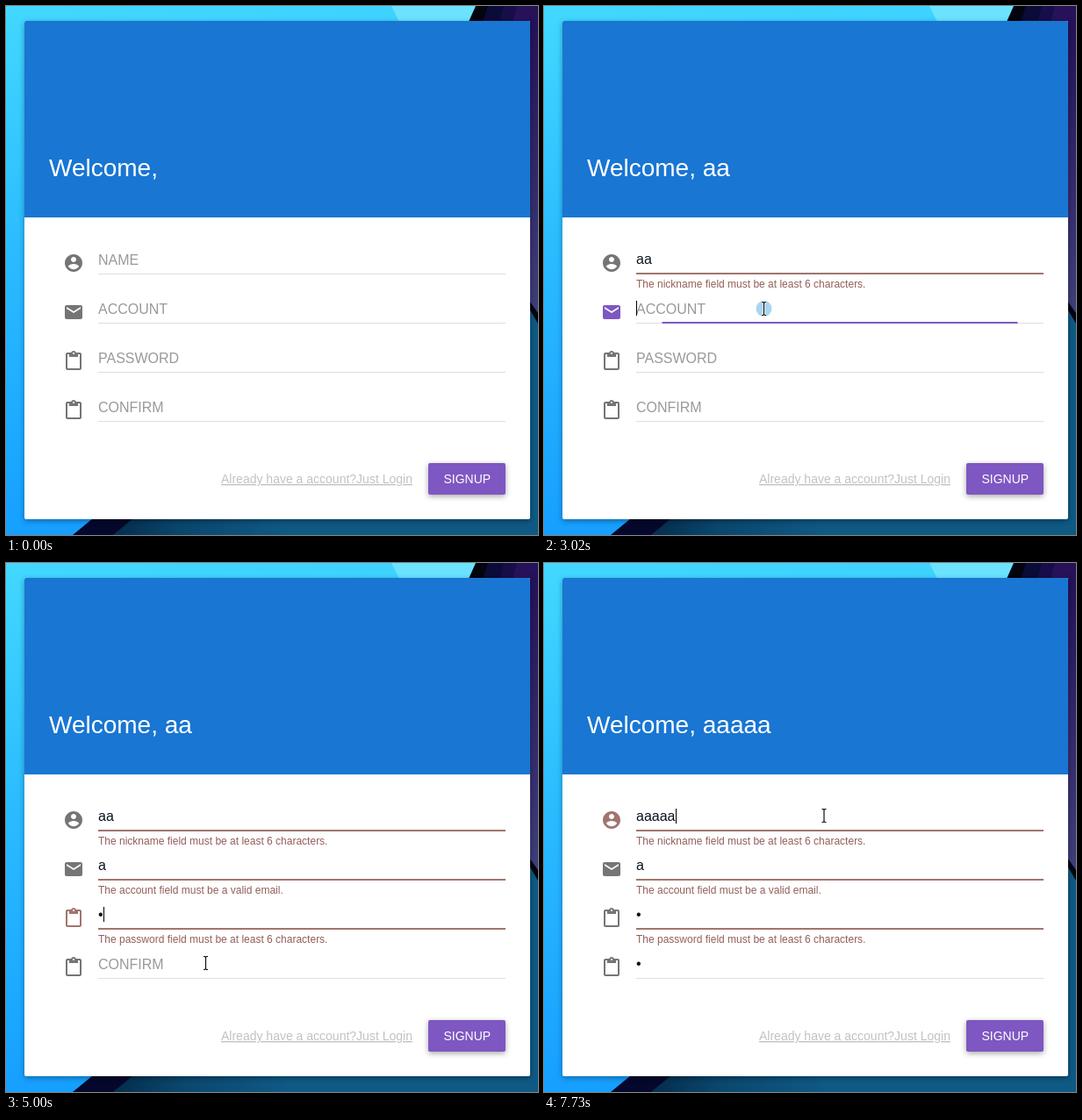
These frames come from a looping animation (606x603 px, 8 s). An HTML page:

```html
<!DOCTYPE html>
<html lang="en">
<head>
<meta charset="utf-8">
<title>Sign up form</title>
<style>
  html, body { margin: 0; width: 100%; height: 100%; overflow: hidden; }
  svg { display: block; width: 100vw; height: 100vh; font: 16px "Liberation Sans", Arial, sans-serif; }
  .card { filter: drop-shadow(0 2px 3px rgba(0, 0, 0, .35)); }
  .welcome { font-size: 28px; fill: #fff; }
  .small { font-size: 14px; }
  .label { fill: #999; }
  .value { fill: #0b1420; }
  .error { font-size: 12px; fill: #935e5a; }
</style>
</head>
<body>
<svg viewBox="0 0 606 603" xmlns="http://www.w3.org/2000/svg">
  <defs>
    <linearGradient id="sky" gradientUnits="userSpaceOnUse" x1="0" y1="0" x2="60" y2="603">
      <stop stop-color="#42d8ff"/><stop offset=".45" stop-color="#2bbcff"/><stop offset="1" stop-color="#169fff"/>
    </linearGradient>
    <linearGradient id="violet" x2="0" y2="1">
      <stop stop-color="#24115a"/><stop offset="1" stop-color="#40407a"/>
    </linearGradient>
    <linearGradient id="sea" gradientUnits="userSpaceOnUse" x1="130" x2="320">
      <stop stop-color="#052f50"/><stop offset=".35" stop-color="#0a466c"/><stop offset="1" stop-color="#0f5985"/>
    </linearGradient>
    <path id="person" d="M12 2C6.48 2 2 6.48 2 12s4.48 10 10 10 10-4.48 10-10S17.52 2 12 2zm0 3c1.66 0 3 1.34 3 3s-1.34 3-3 3-3-1.34-3-3 1.34-3 3-3zm0 14.2c-2.5 0-4.71-1.28-6-3.22.03-1.99 4-3.08 6-3.08 1.99 0 5.97 1.09 6 3.08-1.29 1.94-3.5 3.22-6 3.22z"/>
    <path id="mail" d="M20 4H4c-1.1 0-2 .9-2 2v12c0 1.1.9 2 2 2h16c1.1 0 2-.9 2-2V6c0-1.1-.9-2-2-2zm0 4l-8 5-8-5V6l8 5 8-5z"/>
    <path id="clipboard" d="M19 2h-4.18C14.4.84 13.3 0 12 0S9.6.84 9.18 2H5c-1.1 0-2 .9-2 2v16c0 1.1.9 2 2 2h14c1.1 0 2-.9 2-2V4c0-1.1-.9-2-2-2zm-7 0c.55 0 1 .45 1 1s-.45 1-1 1-1-.45-1-1 .45-1 1-1zm7 18H5V4h2v3h10V4h2z"/>
    <path id="beam" d="M-2.5 -7.5H-1L0 -6.5L1 -7.5H2.5M0 -6.5V6.5M-2.5 7.5H-1L0 6.5L1 7.5H2.5" fill="none"/>
  </defs>

  <rect width="606" height="603" fill="url(#sky)"/>
  <path d="M439 0H535L527 18H448z" fill="#6be3ff"/>
  <path d="M535 0H606V360H590V18H527z" fill="#04040f"/>
  <path d="M549 0H606V18H543z" fill="#0a0b38"/>
  <path d="M567 0H606V18H562z" fill="#170d48"/>
  <path d="M582 0H606V18H577z" fill="#27125a"/>
  <path d="M596 12H606V358L596 336z" fill="url(#violet)"/>
  <path d="M596 336L606 360V603H590V350z" fill="#0f5985"/>
  <path d="M596 336L606 350V362L596 345z" fill="#04040f"/>
  <path d="M99 584H606V603H76z" fill="#05082c"/>
  <path d="M145 584H606V603H122z" fill="url(#sea)"/>

  <rect class="card" x="21" y="17" width="576" height="568" rx="2" fill="#fff"/>
  <path d="M21 241V19a2 2 0 0 1 2-2H595a2 2 0 0 1 2 2V241z" fill="#1976d2"/>
  <text id="welcome" class="welcome" x="49" y="194"></text>
  <g id="fields"></g>
  <text class="small" x="245" y="544" fill="#c2c2c2" text-decoration="underline">Already have a account?Just Login</text>
  <rect class="card" x="481" y="521" width="88" height="36" rx="2" fill="#7e57c2"/>
  <text class="small" x="498.5" y="544" fill="#fff">SIGNUP</text>

  <g id="pointer">
    <circle id="press" r="9" fill="#a9d5f2"/>
    <use href="#beam" stroke="#fff" stroke-width="3" opacity=".9"/>
    <use href="#beam" stroke="#111" stroke-width="1.2"/>
  </g>
</svg>
<script>
const LOOP = 8000, GREY = '#757575', PURPLE = '#7e57c2', BROWN = '#a1756e';
const short = name => `The ${name} field must be at least 6 characters.`;

// focus: [from, to]; keys: times of typed characters; caret: visible spans
const fields = [
  { icon: 'person', label: 'NAME', char: 'a', step: 8.9, error: short('nickname'),
    focus: [[470, 2920], [6250, 9000]], keys: [785, 1850, 6890, 7330, 7730],
    caret: [[470, 1440], [1850, 2450], [6250, 6750], [6890, 8000]] },
  { icon: 'mail', label: 'ACCOUNT', char: 'a', step: 8.9, error: 'The account field must be a valid email.',
    focus: [[2920, 4430]], keys: [3260], caret: [[2920, 3920]] },
  { icon: 'clipboard', label: 'PASSWORD', char: '•', step: 5.6, error: short('password'),
    focus: [[4430, 5090]], keys: [4660], caret: [[4430, 5090]] },
  { icon: 'clipboard', label: 'CONFIRM', char: '•', step: 5.6, error: '',
    focus: [[5090, 6250]], keys: [5480], caret: [[5090, 5980]] }
];
const pointerPath = [
  [2690, 262, 326], [2900, 250.5, 345], [4060, 250.5, 345], [4280, 237.5, 406],
  [4720, 237.5, 406], [4990, 227.5, 456], [5650, 227.5, 456], [5860, 282, 380],
  [6070, 247.5, 290], [6330, 247.5, 290], [6530, 319, 288]
];
const clicks = [2920, 4430, 5090, 6250];

const $ = id => document.getElementById(id);
const clamp = v => Math.max(0, Math.min(1, v));
const easeOut = p => 1 - (1 - clamp(p)) ** 3;
const within = (t, spans) => spans.some(([a, b]) => t >= a && t < b);

$('fields').innerHTML = fields.map((f, i) => `
  <g transform="translate(0 ${i * 56})">
    <use class="icon" href="#${f.icon}" x="65" y="281"/>
    <rect x="105" y="305" width="464" height="1" fill="#dedede"/>
    <rect class="line" y="304" height="2"/>
    <text class="label" x="105" y="295">${f.label}</text>
    <text class="value" x="105" y="294"></text>
    <rect class="caret" y="280" width="1" height="17"/>
    <text class="error" x="105" y="321">${f.error}</text>
  </g>`).join('');
fields.forEach((f, i) => {
  const row = $('fields').children[i];
  for (const part of ['icon', 'line', 'label', 'value', 'caret', 'error'])
    f[part + 'El'] = row.querySelector('.' + part);
});

// The underline is already part-way out when the press first shows.
function lineAmount(f, t) {
  let amount = 0;
  for (const [from, to] of f.focus) {
    if (t >= to) amount = 1 - easeOut((t - to + 48) / 300);
    else if (t >= from) amount = easeOut((t - from + 48) / 300);
  }
  return amount;
}

function drawField(f, t) {
  const typed = f.keys.filter(k => t >= k).length;
  const focused = within(t, f.focus);
  const failed = typed > 0 && f.error;
  const width = 464 * (failed ? 1 : lineAmount(f, t));
  const color = failed ? BROWN : PURPLE;
  f.iconEl.setAttribute('fill', focused ? color : GREY);
  f.lineEl.setAttribute('x', 337 - width / 2);
  f.lineEl.setAttribute('width', width);
  f.lineEl.setAttribute('fill', color);
  f.labelEl.style.opacity = 1 - clamp((t - f.keys[0]) / 300);
  f.valueEl.textContent = f.char.repeat(typed);
  f.caretEl.setAttribute('x', Math.round(105 + typed * f.step));
  f.caretEl.style.opacity = +within(t, f.caret);
  f.errorEl.style.opacity = failed ? clamp((t - f.keys[0]) / 150) : 0;
}

function drawPointer(t) {
  const next = pointerPath.findIndex(p => p[0] > t);
  const b = pointerPath.at(next), a = next > 0 ? pointerPath[next - 1] : b;
  const p = a === b ? 0 : (t - a[0]) / (b[0] - a[0]);
  const s = p * p * (3 - 2 * p);
  const [x, y] = [1, 2].map(k => a[k] + (b[k] - a[k]) * s);
  $('pointer').style.opacity = +(t >= pointerPath[0][0]);
  $('pointer').setAttribute('transform', `translate(${x} ${y})`);
  $('press').style.opacity = +clicks.some(c => t >= c && t < c + 200);
}

function draw(t) {
  fields.forEach(f => drawField(f, t));
  const name = fields[0].valueEl.textContent;
  $('welcome').textContent = 'Welcome, ' + name;
  drawPointer(t);
}

const start = performance.now();
function tick() {
  draw((performance.now() - start) % LOOP);
  requestAnimationFrame(tick);
}
tick();
</script>
</body>
</html>
```
